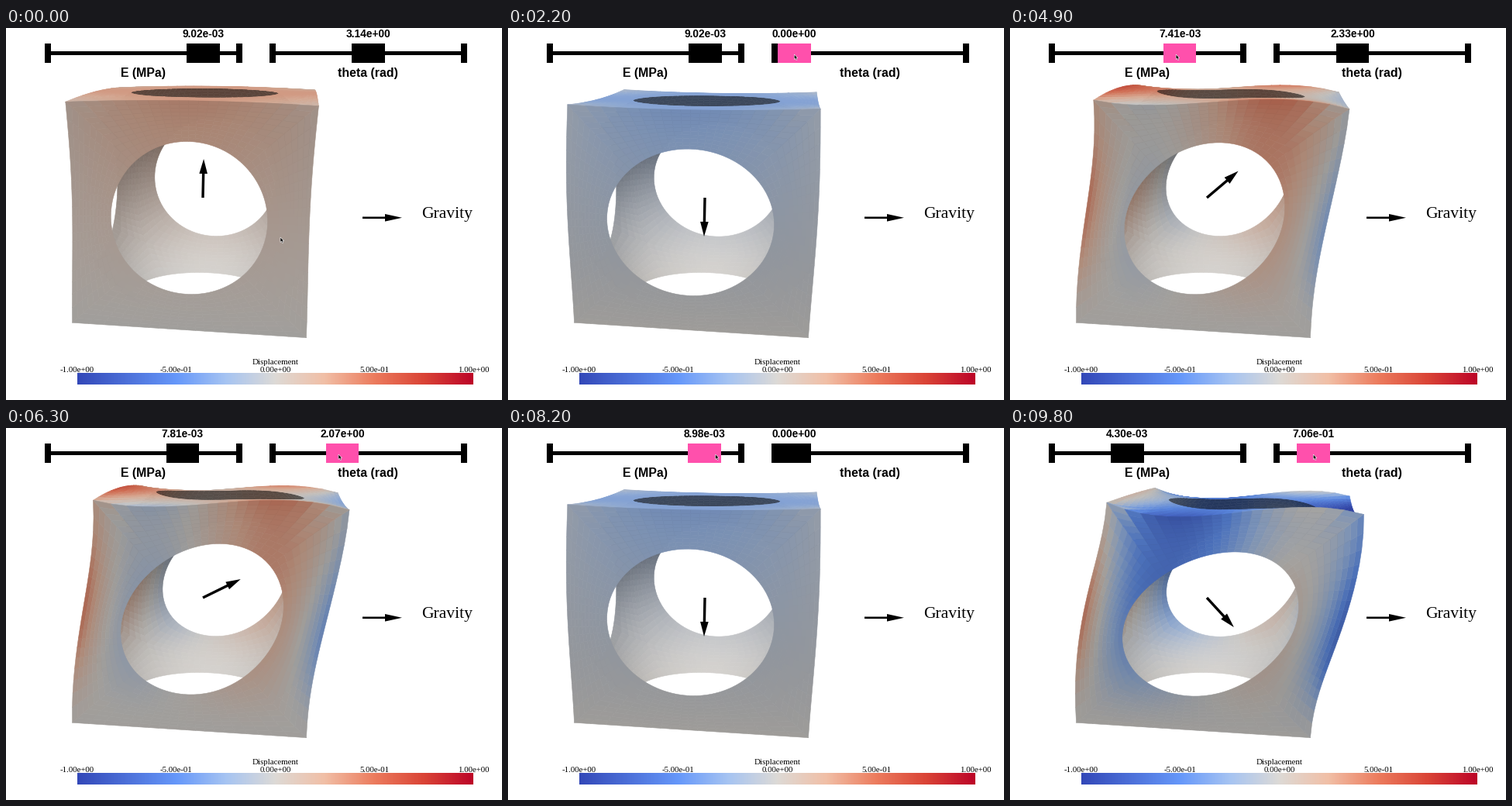
A matplotlib script for the animation above (9900 ms loop, 640 by 480 pixels).

```python
import numpy as np
import matplotlib.pyplot as plt
from matplotlib.animation import FuncAnimation
from matplotlib.collections import PolyCollection
from matplotlib.colors import LinearSegmentedColormap
from matplotlib.patches import Polygon, Rectangle

W, H, DPI = 640, 480, 100
FRAMES, STEP = 99, 100
PINK = "#ff50ac"
E_REF = 9.02

# Turning points of each drag: (seconds, value), eased in between.
E_KEYS = [(4.2, E_REF), (5.2, 6.966), (5.6, 7.81), (8.0, 7.81),
          (8.35, 9.74), (8.9, 4.30)]
THETA_KEYS = [(1.0, 3.14), (2.1, 0), (2.3, 0), (3.45, 5.643), (4.0, 2.33),
              (5.7, 2.33), (5.9, 2.7), (6.5, 1.85), (7.25, 3.7), (7.9, 0),
              (9.0, 0), (9.8, 0.706)]
# Which slider the pointer holds: (from, to, name).
HOLDS = [(1.0, 4.05, "theta"), (4.15, 5.65, "E"), (5.7, 7.95, "theta"),
         (8.05, 8.95, "E"), (9.05, 9.9, "theta")]
POINTER_START = (354, 270)


def smooth(u):
    return u * u * (3 - 2 * u)


def eased(keys, t):
    if t <= keys[0][0]:
        return keys[0][1]
    for (t0, a), (t1, b) in zip(keys, keys[1:]):
        if t < t1:
            return a + (b - a) * smooth((t - t0) / (t1 - t0))
    return keys[-1][1]


def e_at(t):
    return eased(E_KEYS, t)


def theta_at(t):
    return eased(THETA_KEYS, t)


def e_x(t):
    return 254.3 + 21.82 * (e_at(t) - E_REF)


def theta_x(t):
    return 369.3 + 31.2 * theta_at(t)


def held_at(t):
    return next((name for a, b, name in HOLDS if a <= t < b), None)


def pointer_at(t, lead=0.1):
    """The pointer runs slightly ahead of the knob it drags."""
    def on_knob(name, t):
        return np.array([(e_x if name == "E" else theta_x)(t + lead), 34])

    left, since = np.array(POINTER_START), 0
    for a, b, name in HOLDS:
        if t < a:
            return left + (on_knob(name, a) - left) * smooth((t - since) / (a - since))
        if t < b:
            return on_knob(name, t)
        left, since = on_knob(name, b), b
    return left


cmap = LinearSegmentedColormap.from_list("coolwarm", [
    (0, "#3348b8"), (0.25, "#6698fa"), (0.375, "#a6c4f2"), (0.5, "#dddad6"),
    (0.625, "#f1bfa6"), (0.75, "#ec7c5e"), (0.875, "#da4436"), (1, "#bc0428")], N=512)


# ---- camera fitted to the eight projected corners of the unit cube ----
def fit_camera():
    corners = [(x, y, z) for y in (-.5, .5) for z in (.5, -.5) for x in (-.5, .5)]
    screen = [(77.5, 97), (404, 102.5), (85, 380), (386.7, 400),
              (149, 78), (398, 81.5), (153, 299), (387, 310)]
    rows, rhs = [], []
    for (x, y, z), (u, v) in zip(corners, screen):
        rows.append([x, y, z, 1, 0, 0, 0, 0, -u * x, -u * y, -u * z])
        rows.append([0, 0, 0, 0, x, y, z, 1, -v * x, -v * y, -v * z])
        rhs += [u, v]
    p = np.linalg.lstsq(np.array(rows), np.array(rhs), rcond=None)[0]
    cam = np.append(p, 1).reshape(3, 4)
    return cam, -np.linalg.solve(cam[:, :3], cam[:, 3])


CAM, EYE = fit_camera()


def project(pts):
    q = pts @ CAM[:, :3].T + CAM[:, 3]
    return q[..., :2] / q[..., 2:]


# ---- cube with a spherical cavity that opens a round hole in each face ----
HOLE = 1 / 3
RADIUS = np.hypot(0.5, HOLE)


def normals(quads):
    n = np.cross(quads[:, 2] - quads[:, 0], quads[:, 3] - quads[:, 1])
    return n / (np.linalg.norm(n, axis=1, keepdims=True) + 1e-12)


def to_quads(grid, outward):
    q = np.stack([grid[:-1, :-1], grid[1:, :-1], grid[1:, 1:], grid[:-1, 1:]], axis=2)
    q = q.reshape(-1, 4, 3)
    flip = (normals(q) * outward(q.mean(axis=1))).sum(axis=1) < 0
    q[flip] = q[flip][:, ::-1]
    return q


def face_grid(axis, sign, rings, n=80):
    ang = np.linspace(0, 2 * np.pi, n + 1)
    ca, sa = np.cos(ang), np.sin(ang)
    square = 0.5 / np.maximum(abs(ca), abs(sa))
    mix = np.linspace(0, 1, rings + 1)[:, None]
    rad = HOLE * (1 - mix) + square * mix
    grid = np.zeros(rad.shape + (3,))
    grid[..., axis] = 0.5 * sign
    grid[..., (axis + 1) % 3] = rad * ca
    grid[..., (axis + 2) % 3] = rad * sa
    return grid


def build():
    outer, inner = [], []
    for axis in range(3):
        for sign in (-1, 1):
            out = sign * np.eye(3)[axis]
            outer.append(to_quads(face_grid(axis, sign, 11), lambda c: out))
            ball = face_grid(axis, sign, 5)
            ball *= RADIUS / np.linalg.norm(ball, axis=-1, keepdims=True)
            inner.append(to_quads(ball, lambda c: -c))
    return np.concatenate(inner), np.concatenate(outer)


INNER, OUTER = build()
QUADS = np.concatenate([INNER, OUTER])
LAYER = np.repeat([0, 1], [len(INNER), len(OUTER)])


def deform(pts, e, theta):
    """Bend and stretch the block; returns moved points and vertical shift."""
    x, y, z = np.moveaxis(pts, -1, 0)
    h = np.clip(z + 0.5, 0, 1)
    s, c = np.sin(theta) * E_REF / e, np.cos(theta) * E_REF / e

    bulge = 0.0118 * c * np.sin(np.pi * h**1.3)
    ux = 0.1135 * s * smooth(h**1.1) + bulge * np.sin(np.pi * x)
    uy = bulge * np.sin(np.pi * y)

    # posts rotate as they lean, the beams between them follow in a wave
    wave = 3.1 * x * (0.16 + 0.045 * h**4 - x * x)
    turn = 24 * (h * (1 - h))**2 + 1.4 * h**3
    lean = wave * turn * (0.3 + 2.8 * y * y) - 0.45 * x * (1 - 4 * y * y) * h**3
    sag = 0.006 * (1 - (1 - h)**2) + 0.013 * (1 - 16 * x * x * y * y) * h * h
    uz = 0.1135 * s * lean - c * sag
    return pts + np.stack([ux, uy, uz], axis=-1), uz


def shaded_mesh(e, theta):
    moved, uz = deform(QUADS, e, theta)
    n, mid = normals(moved), moved.mean(axis=1)
    to_eye = EYE - mid
    seen = np.flatnonzero((n * to_eye).sum(axis=1) > 0)
    dist = np.linalg.norm(to_eye, axis=1) - 100 * LAYER
    seen = seen[np.argsort(-dist[seen])]
    light = np.clip(0.42 + n[seen] @ np.array([0, -0.3, 0.45]), 0.38, 1)
    rgba = cmap(0.5 + 8 * uz[seen].mean(axis=1))
    rgba[:, :3] *= light[:, None]
    return project(moved[seen]), rgba


# ---- stage ----
fig = plt.figure(figsize=(W / DPI, H / DPI), dpi=DPI, facecolor="white")
ax = fig.add_axes([0, 0, 1, 1])

ax.imshow(np.linspace(-1, 1, 512)[None], cmap=cmap, aspect="auto",
          extent=(92, 603, 460, 445.5))
ax.set_xlim(0, W)
ax.set_ylim(H, 0)
ax.axis("off")


def label(x, y, text, px, font="Liberation Serif", weight="normal"):
    return ax.text(x, y, text, fontsize=px * 72 / DPI, family=font, weight=weight,
                   color="black", ha="center", va="baseline", zorder=6)


def box(x, y, w, h, z=3):
    return ax.add_patch(Rectangle((x, y), w, h, fc="black", ec="none", zorder=z))


def shape(z, **style):
    return ax.add_patch(Polygon([(0, 0), (1, 0), (1, 1)], fc="black", zorder=z, **style))


def arrow_shape(tail, tip, head, half, shaft):
    a, b = np.array(tail, float), np.array(tip, float)
    d = (b - a) / np.hypot(*(b - a))
    n = np.array([-d[1], d[0]])
    neck = b - head * d
    return [a + shaft * n, neck + shaft * n, neck + half * n, b,
            neck - half * n, neck - shaft * n, a - shaft * n]


class Slider:
    def __init__(self, left, right, title, title_x):
        box(left, 30, right - left, 5)
        box(left, 20, 8, 24.5)
        box(right - 8, 20, 8, 24.5)
        self.body = box(0, 20, 42.5, 25, z=4)
        self.value = label(0, 12, "", 13.7, "Liberation Sans", "bold")
        label(title_x, 63, title, 15.9, "Liberation Sans", "bold")

    def show(self, center, text, active):
        self.body.set_x(center - 21.25)
        self.body.set_facecolor(PINK if active else "black")
        self.value.set_position((center, 12))
        self.value.set_text(text)


e_slider = Slider(50, 305, "E (MPa)", 176.5)
theta_slider = Slider(340, 595, "theta (rad)", 466.5)

for i in range(5):
    label(92 + 127.8 * i, 443.5, f"{-1 + 0.5 * i:.2e}", 10.9)
label(348, 434.5, "Displacement", 10.9)
label(569.3, 245, "Gravity", 21.6)
shape(5, ec="none").set_xy(arrow_shape((460, 244.8), (511, 244.8), 22, 4.8, 1.3))

mesh = ax.add_collection(PolyCollection([], edgecolors="face", linewidths=0.4, zorder=2),
                         autolim=False)
arrow = shape(5, ec="none")
pointer = shape(8, ec="white", lw=0.4)
POINTER = np.array([(0, 0), (0, 6.5), (1.5, 5.2), (2.6, 7.6), (3.7, 7.1),
                    (2.7, 4.8), (4.6, 4.6)])


def draw(i):
    t = i * STEP / 1000
    e, theta, held = e_at(t), theta_at(t), held_at(t)
    verts, colors = shaded_mesh(e, theta)
    mesh.set_verts(verts)
    mesh.set_facecolor(colors)

    e_slider.show(e_x(t), f"{e / 1000:.2e}", held == "E")
    theta_slider.show(theta_x(t), f"{theta:.2e}", held == "theta")

    s, c = np.sin(theta), np.cos(theta)
    tip = (254 + 55 * s - c, 219 + 50 * c)
    arrow.set_xy(arrow_shape((254, 219), tip, 19, 5.3, 1.7))
    pointer.set_xy(POINTER + pointer_at(t))
    return mesh, arrow, pointer


anim = FuncAnimation(fig, draw, frames=FRAMES, interval=STEP, repeat=True,
                     repeat_delay=0, cache_frame_data=False)
plt.show()
```
